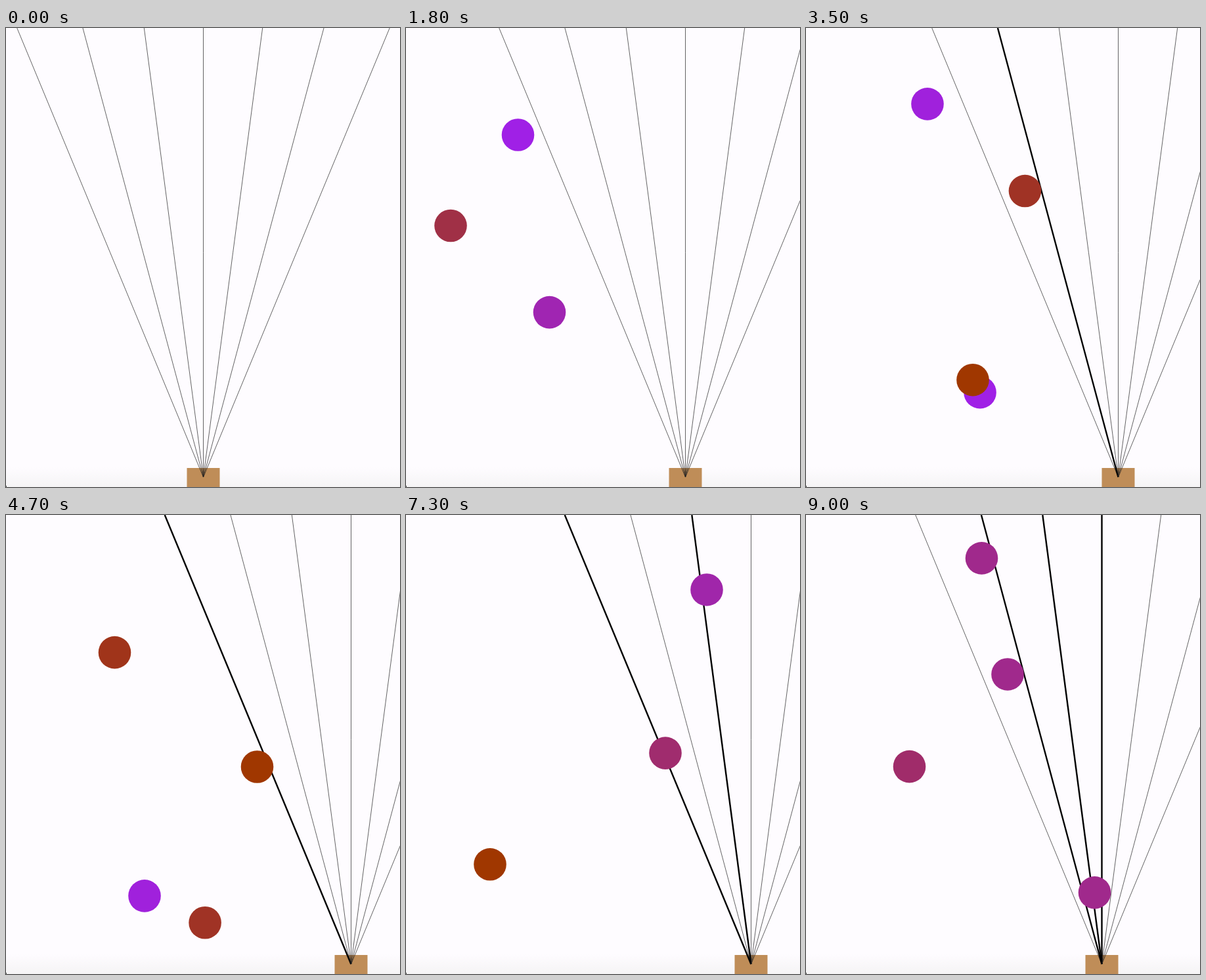
An HTML page with a canvas that plays this animation: 600x700 px, repeating every 9.1 s.

```html
<!DOCTYPE html>
<html lang="en">
<head>
<meta charset="utf-8">
<title>Falling balls and ray sensors</title>
<style>
  html, body { margin: 0; width: 100%; height: 100%; overflow: hidden; background: #fefcff; }
  canvas { display: block; }
</style>
</head>
<body>
<canvas id="stage" width="600" height="700"></canvas>
<script>
const ctx = document.getElementById('stage').getContext('2d');
const W = 600, H = 700, STEP_MS = 100, STEPS = 91;
const RADIUS = 24.8, SPEED = 38.75, STRIDE = 25, TURN = 57;
const EYE_Y = 685, RAYS = 7, RAY_GAP = Math.PI / 24;

// Each ball: step of entry, x, blue, then speed and drift per step where they differ
const balls = [
  [6.17, 218.5, 178],
  [9.58, 68, 70],
  [9.87, 125.3, 230, 23.1, 5.56],
  [20.51, 254, 0],
  [26.21, 355.7, 37, 31.1, -2.53],
  [31.37, 177.1, 220, SPEED, 2.17],
  [36.45, 382.5, 0],
  [41.92, 165.5, 26, 46.15],
  [47.13, 406.5, 30, 52],
  [51.53, 310.5, 196],
  [55.52, 182.5, 50, 45],
  [58.61, 128, 0],
  [62.99, 395, 110],
  [69.42, 458, 170],
  [74.5, 439.5, 140],
  [79.46, 157.5, 106],
  [83.09, 307, 140],
  [87.66, 267.5, 140]
];

const floorShade = ctx.createLinearGradient(0, 670, 0, H);
floorShade.addColorStop(0, '#fefcff');
floorShade.addColorStop(1, '#f5f4f5');

function ballAt(step, [enter, x, blue, speed = SPEED, drift = 0]) {
  const age = step - enter;
  return {
    x: x + drift * age,
    y: speed * age - RADIUS,
    fill: `rgb(160, ${Math.round(55 - blue / 10)}, ${blue})`
  };
}

// The agent wavers to the right edge, then returns steadily, always in whole strides.
function agentX(step) {
  const phase = step / TURN;
  const strides = phase < 1
    ? 12 * phase + 0.9 * Math.sin(2 * Math.PI * phase)
    : 12 - (step - TURN) / 5.5;
  return 300.5 + STRIDE * Math.round(strides);
}

function drawRay(eyeX, angle, visible) {
  const sin = Math.sin(angle), cos = Math.cos(angle);
  const hit = visible.some(({ x, y }) =>
    y < EYE_Y && Math.abs((x - eyeX) * cos - (EYE_Y - y) * sin) < RADIUS);
  ctx.strokeStyle = hit ? '#000' : '#222';
  ctx.lineWidth = hit ? 2.4 : 0.7;
  ctx.beginPath();
  ctx.moveTo(eyeX, EYE_Y);
  ctx.lineTo(eyeX + Math.tan(angle) * EYE_Y, 0);
  ctx.stroke();
}

function draw(step) {
  const eyeX = agentX(step);
  const visible = balls.map(ball => ballAt(step, ball))
    .filter(({ y }) => y > -RADIUS && y < H + RADIUS);

  ctx.fillStyle = floorShade;
  ctx.fillRect(0, 0, W, H);
  ctx.fillStyle = '#555';
  ctx.fillRect(0, 698, 1, 2);

  ctx.fillStyle = '#bf8d58';
  ctx.fillRect(eyeX - 25, 671, 50, 29);

  for (let i = 0; i < RAYS; i++) drawRay(eyeX, (i - 3) * RAY_GAP, visible);

  for (const { x, y, fill } of visible) {
    ctx.fillStyle = fill;
    ctx.beginPath();
    ctx.arc(x, y, RADIUS, 0, Math.PI * 2);
    ctx.fill();
  }
}

const start = performance.now();
function tick() {
  draw(Math.floor((performance.now() - start) / STEP_MS) % STEPS);
  requestAnimationFrame(tick);
}
tick();
</script>
</body>
</html>
```
